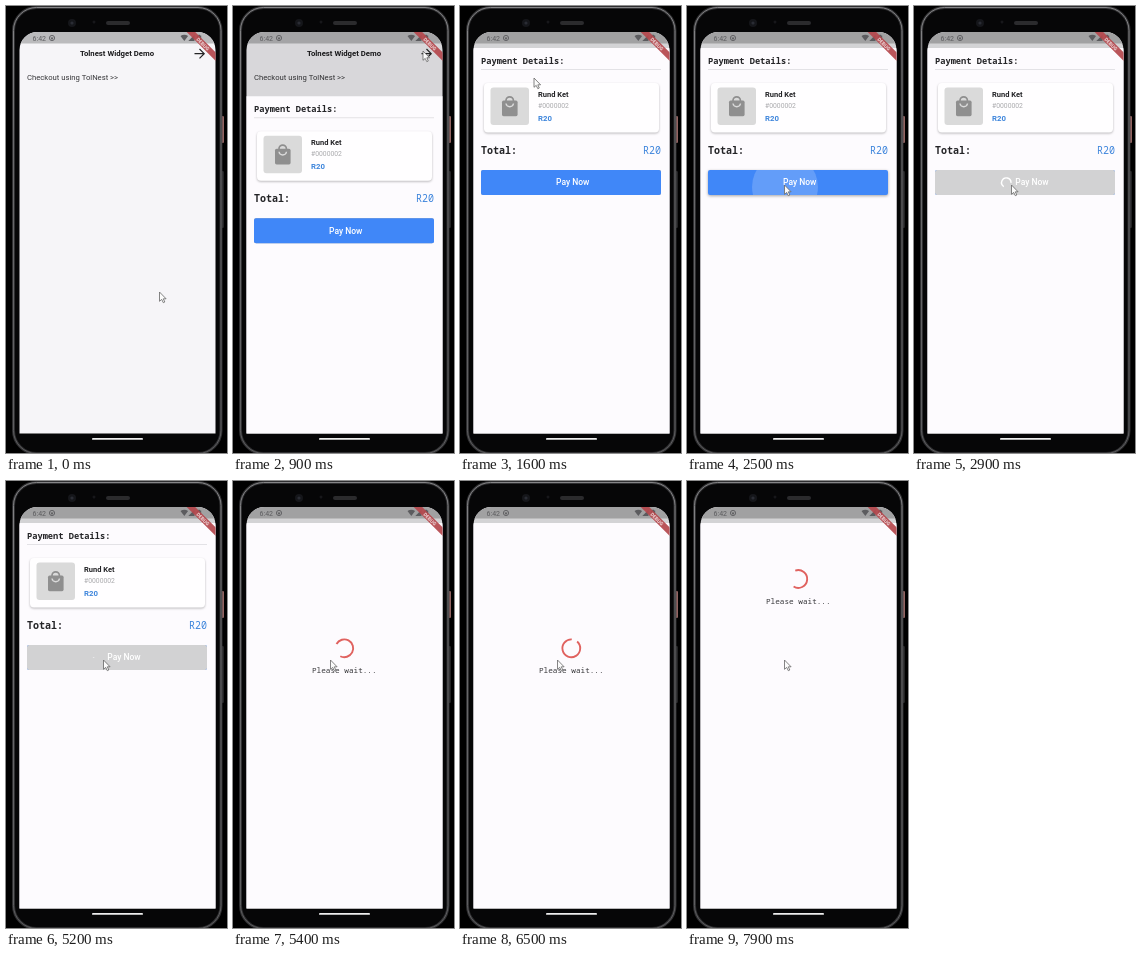
These frames come from a looping animation (221x447 px, 8000 ms). An HTML page:

```html
<!DOCTYPE html>
<html lang="en">
<head>
<meta charset="utf-8">
<title>Checkout widget demo</title>
<style>
  html, body { margin: 0; width: 100%; height: 100%; overflow: hidden; background: #000; }
  svg { display: block; width: 100%; height: 100%; }
  text { font-family: Roboto, sans-serif; white-space: pre; }
  .mono { font-family: "Noto Sans Mono", "DejaVu Sans Mono", monospace; }
  .bold { font-weight: 700; }
  .medium { font-weight: 500; }
  .semi { font-weight: 600; }
  .mid { text-anchor: middle; }
  .end { text-anchor: end; }
  .blue { fill: #3f86dc; }
  .ink { fill: #242427; }
  .card { filter: drop-shadow(0 1px 1px #0004); }
</style>
</head>
<body>
<svg viewBox="0 0 221 447">
  <defs>
    <clipPath id="screenClip"><path d="M13.5 427.4V44a18 18 0 0 1 18-18H191.5a18 18 0 0 1 18 18V427.4Z"/></clipPath>
    <clipPath id="buttonClip"><rect x="21" y="164" width="180" height="25" rx="2"/></clipPath>
    <linearGradient id="rim" x2="0" y2="1">
      <stop stop-color="#858587"/><stop offset=".3" stop-color="#6a6a6c"/><stop offset="1" stop-color="#5c5c5e"/>
    </linearGradient>
  </defs>

  <!-- phone -->
  <rect width="221" height="447"/>
  <rect x="215.6" y="110" width="2.2" height="27" rx="1" fill="#b97f7c"/>
  <rect x="215.6" y="165" width="2" height="57" rx="1" fill="#3a3a3c"/>
  <rect x="7.5" y="1.5" width="207.5" height="446" rx="23" fill="#060607" stroke="#2f2f31" stroke-width="3"/>
  <rect x="7.5" y="1.5" width="207.5" height="446" rx="23" fill="none" stroke="url(#rim)" stroke-width="1"/>
  <rect x="100" y="15" width="24" height="4" rx="2" fill="#2b2b2d"/>
  <circle cx="66" cy="17" r="4" fill="#15161a"/>
  <circle cx="66" cy="17" r="1.6" fill="#2a2c34"/>
  <circle cx="88" cy="16" r="1.5" fill="#17171a"/>
  <rect x="86" y="432" width="51" height="1.8" rx=".9" fill="#eee"/>

  <g clip-path="url(#screenClip)">
    <!-- first page -->
    <rect x="13" y="26" width="197" height="402" fill="#f6f5f8"/>
    <rect x="13" y="26" width="197" height="11.5" fill="#bbbbbd"/>
    <text class="bold mid" x="111" y="50.3" font-size="7.75" fill="#1c1c1e">Tolnest Widget Demo</text>
    <path d="M188.5 47.7h9.4M193.5 43l4.7 4.7l-4.7 4.7" fill="none" stroke="#252527" stroke-width="1.2"/>
    <text x="21" y="74" font-size="7.7" fill="#38383b">Checkout using TolNest &gt;&gt;</text>
    <rect id="scrim" x="13" y="26" width="197" height="402" fill="#000" opacity="0"/>

    <!-- sheet -->
    <g id="sheet">
      <rect x="13" y="42" width="197" height="386" fill="#fdfbfe"/>
      <g id="details">
        <text class="mono semi ink" x="21" y="58" font-size="8.7">Payment Details:</text>
        <path d="M21 63.5H201" stroke="#dddce0" stroke-width=".8"/>
        <rect class="card" x="24" y="77" width="175" height="49.5" rx="4" fill="#fffeff"/>
        <rect x="30.5" y="81.5" width="38.5" height="37.5" rx="3" fill="#dadada"/>
        <path d="M46 96v-1.5a3.7 3.7 0 0 1 7.4 0V96" fill="none" stroke="#8f8f8f" stroke-width="1.7"/>
        <rect x="42" y="94.6" width="15.6" height="15.6" rx="1.6" fill="#8f8f8f"/>
        <path d="M46 97.5a3.8 3.8 0 0 0 7.5 0" fill="none" stroke="#dadada" stroke-width="1.4"/>
        <text class="bold ink" x="78" y="91.2" font-size="7.5">Rund Ket</text>
        <text x="78" y="101.8" font-size="6.8" fill="#a9a9ac">#0000002</text>
        <text class="blue semi" x="78" y="114.5" font-size="7.8">R20</text>
        <text class="mono semi ink" x="21" y="147.6" font-size="10">Total:</text>
        <text class="mono medium blue end" x="201" y="147.6" font-size="10">R20</text>
        <rect id="button" x="21" y="164" width="180" height="25" rx="2" fill="#4087f8"/>
        <g clip-path="url(#buttonClip)"><circle id="ripple" cx="98" cy="181" fill="#fff"/></g>
        <rect id="disabled" x="21" y="164" width="180" height="25" rx="2" fill="#d2d2d3"/>
        <text id="label" class="medium" y="179.3" font-size="8.5" fill="#fff">Pay Now</text>
        <path id="smallArc" fill="none" stroke="#fff" stroke-width="1.4"/>
      </g>
      <g id="wait">
        <path id="bigArc" fill="none" stroke="#e0625f" stroke-width="1.9"/>
        <text class="mono" x="79" y="192.3" font-size="7.7" fill="#38383b">Please wait...</text>
      </g>
    </g>

    <!-- status bar -->
    <g fill="#5c5c5f">
      <text x="26.5" y="34.6" font-size="7">6:42</text>
      <circle cx="46" cy="32" r="2.6" fill="none" stroke="#5c5c5f" stroke-width=".9"/>
      <path d="M44.5 31.5h3l-1.5 2.4z"/>
      <path d="M174.5 30q3.8-2.6 7.6 0l-3.8 5z"/>
      <path d="M188.5 28.8v6.2h-6.2z"/>
      <path d="M191 29.6h1.2v-.8h1.8v.8h1.2V35H191z"/>
    </g>
    <g transform="translate(209 26) rotate(45)">
      <rect x="-24" y="14" width="48" height="6" fill="#b5474d" opacity=".92"/>
      <text class="bold mid" y="18.8" font-size="5" fill="#f0dcdd">DEBUG</text>
    </g>
  </g>

  <path id="cursor" d="M0 0V9.3L2.2 7.4L3.8 10.7L5.3 10L3.8 6.8H6.6Z" fill="#fbfbfb" stroke="#666" stroke-width=".8" stroke-linejoin="round"/>
</svg>
<script>
  const LOOP = 8000, STEP = 100;
  const $ = id => document.getElementById(id);
  const set = (id, attrs) => { for (const k in attrs) $(id).setAttribute(k, attrs[k]); };
  const clamp = v => Math.min(1, Math.max(0, v));
  const ramp = (t, a, b) => clamp((t - a) / (b - a));
  const smooth = u => u * u * (3 - 2 * u);
  const frac = v => v - Math.floor(v);

  const pauses = [[1400, 1500], [2400, 2500], [3000, 3100], [3300, 3500],
                  [4300, 4400], [4600, 4700], [5600, 6500]];
  const hold = t => {
    const p = pauses.find(([a, b]) => t >= a && t < b);
    return p ? p[0] - STEP : t;
  };

  // cubic-bezier(.4, 0, .2, 1)
  function fastOut(x) {
    let lo = 0, hi = 1;
    for (let i = 0; i < 14; i++) {
      const s = (lo + hi) / 2, r = 1 - s;
      if (1.2 * r * r * s + .6 * r * s * s + s * s * s < x) lo = s; else hi = s;
    }
    return lo * lo * (3 - 2 * lo);
  }

  // indeterminate ring: the head runs ahead, then the tail catches up
  function ring(cx, cy, r, phase, turn, reach) {
    const p = frac(phase);
    const head = fastOut(clamp(p * 2)), tail = fastOut(clamp(p * 2 - 1));
    const from = turn + tail * reach + p * (360 - reach);
    const sweep = Math.max(4, (head - tail) * reach);
    const at = deg => {
      const a = deg * Math.PI / 180;
      return `${cx + r * Math.cos(a)} ${cy + r * Math.sin(a)}`;
    };
    return `M${at(from)}A${r} ${r} 0 ${sweep > 180 ? 1 : 0} 1 ${at(from + sweep)}`;
  }

  const track = [[200, 153.5, 286], [700, 190, 45], [1000, 190, 45], [1300, 126, 52],
                 [1400, 126, 52], [1600, 74, 72], [1700, 76, 76], [2200, 97.5, 179]];
  function pointer(t) {
    let i = 0;
    while (i < track.length - 2 && t > track[i + 1][0]) i++;
    const [a, x, y] = track[i], [b, x2, y2] = track[i + 1];
    const u = smooth(ramp(t, a, b));
    return [x + (x2 - x) * u, y + (y2 - y) * u];
  }

  function draw(now) {
    const t = hold(Math.floor(now % LOOP / STEP) * STEP);

    const open = 1 - (1 - ramp(t, 750, 1050)) ** 3;
    set('sheet', { transform: `translate(0 ${(1 - open) * 386})` });
    set('scrim', { opacity: open * .14 });
    const [x, y] = pointer(t);
    set('cursor', { transform: `translate(${x} ${y})` });

    const waiting = t >= 5400;
    $('details').style.display = waiting ? 'none' : '';
    $('wait').style.display = waiting ? '' : 'none';

    const loading = t >= 2700;
    const off = ramp(t, 2600, 2900);
    const lift = ramp(t, 2300, 2500) * (1 - off);
    $('button').style.filter =
      `drop-shadow(0 ${.6 + lift}px ${.6 + lift}px rgba(0,0,0,${.35 * (1 - off)}))`;
    set('ripple', {
      r: Math.max(0, 33 + (t - 2500) * .25),
      opacity: t < 2500 ? 0 : .18 * (1 - ramp(t, 2500, 2900))
    });
    set('disabled', { opacity: off });
    set('label', { x: loading ? 101.3 : 96 });
    set('smallArc', {
      d: ring(92.3, 176.6, 4.7, .14 + (t - 4000) / 1333, 117 + (t - 4000) * .349, 270),
      opacity: loading ? 1 : 0
    });

    const up = t >= 6900;
    set('wait', { transform: `translate(0 ${up ? -69.3 : 0})` });
    set('bigArc', { d: ring(111.3, 167.3, 8.9, .5 + (t - 6500) / 1235, -68 + (t - 6500) * .1457, 322) });
  }

  const start = performance.now();
  function frame() {
    draw(performance.now() - start);
    requestAnimationFrame(frame);
  }
  frame();
</script>
</body>
</html>
```
